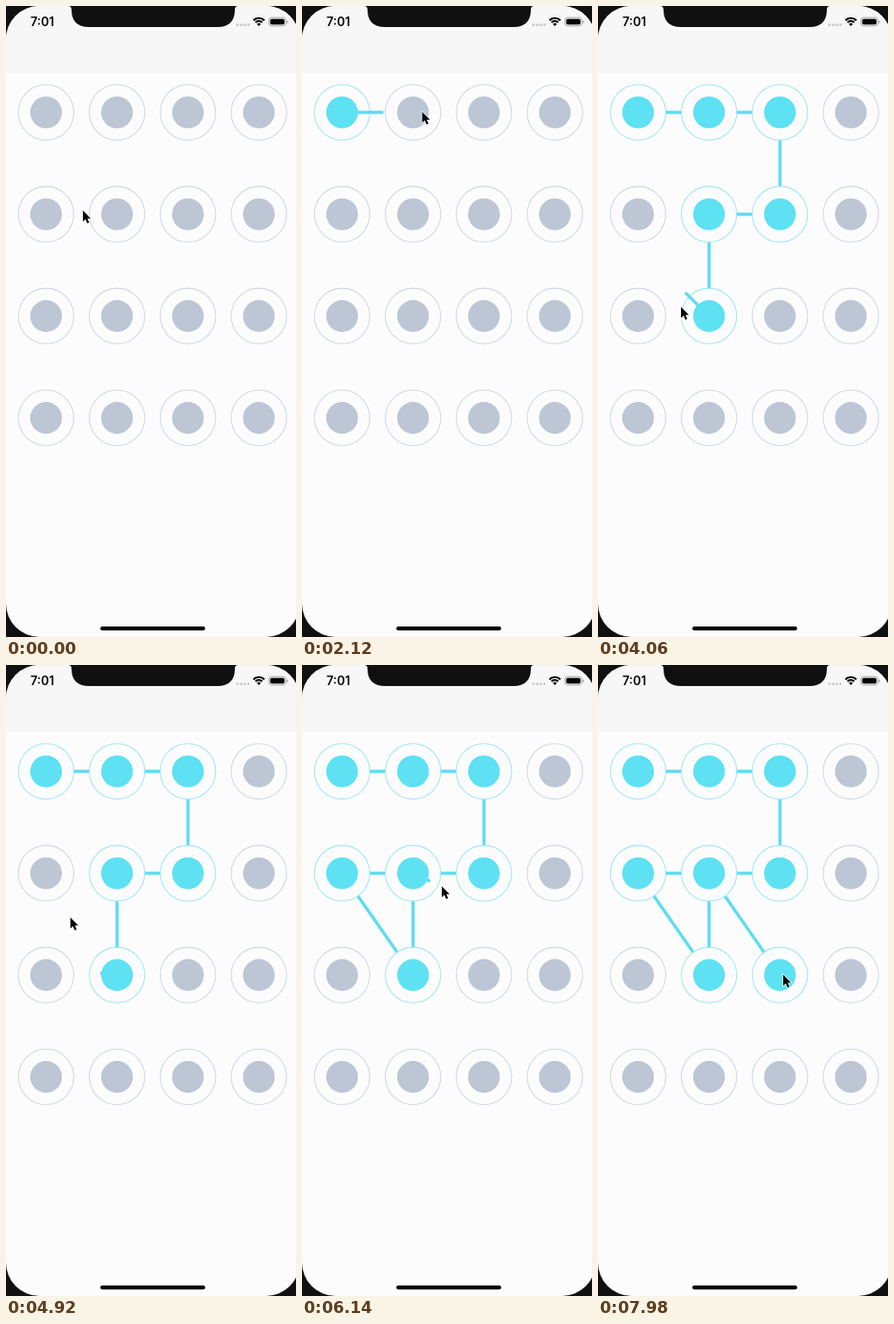
These frames come from a looping animation (332 by 720 pixels, 8 s). An HTML page with a canvas:

```html
<!DOCTYPE html>
<html lang="en">
<head>
<meta charset="utf-8">
<title>Pattern lock</title>
<style>
  html, body { margin: 0; width: 100%; height: 100%; overflow: hidden; background: #101010; }
  canvas { display: block; }
</style>
</head>
<body>
<canvas id="stage" width="332" height="720"></canvas>
<script>
const ctx = document.getElementById('stage').getContext('2d');
const LOOP = 8000;
const LAG = 300; // the screen responds a little after the pointer
const TOUCH = 1500;
const RING = 31.7, DOT = 18.2;
const BLACK = '#101010', INK = '#060606', PAPER = '#fcfcfc', GREY = '#a4a4a4';
const IDLE = { dot: '#bdc6d5', ring: '#d0d7e4' };
const ACTIVE = { dot: '#5de1f3', ring: '#a0e6f4' };

const nodes = Array.from({ length: 16 }, (_, i) => ({
  x: 45.9 + (i % 4) * 81.2,
  y: 121.4 + Math.floor(i / 4) * 116.2
}));

const at = (time, x, y) => ({ time, x, y });
const trace = (start, step, ...ids) =>
  ids.map((id, i) => at(start + i * step, nodes[id].x, nodes[id].y));

// Quick strokes through the nodes, with pauses to wander in between
const path = [
  at(0, 88, 234), at(960, 141, 233),
  ...trace(TOUCH, 550, 0, 1, 2), at(2960, 201, 186),
  ...trace(3130, 220, 6, 5, 9), at(3760, 100, 327), at(4060, 95, 344), at(4620, 108, 352),
  ...trace(5165, 235, 4, 5), at(6140, 160, 253), at(6950, 212, 354)
];

function pointerAt(t) {
  const next = path.findIndex(p => p.time > t);
  if (next < 0) return path[path.length - 1];
  if (next === 0) return path[0];
  const a = path[next - 1], b = path[next];
  const k = (t - a.time) / (b.time - a.time);
  return { x: a.x + (b.x - a.x) * k, y: a.y + (b.y - a.y) * k };
}

// A node joins the pattern when the touch enters its dot.
const joins = [];
for (let time = TOUCH; time < LOOP; time += 10) {
  const p = pointerAt(time);
  const node = nodes.find(n => Math.hypot(n.x - p.x, n.y - p.y) < DOT);
  if (node && node !== joins[joins.length - 1]?.node) joins.push({ time, node });
}

function circle(x, y, radius) {
  ctx.beginPath();
  ctx.arc(x, y, radius, 0, Math.PI * 2);
}

function line(a, b) {
  ctx.strokeStyle = '#60dcf1';
  ctx.lineWidth = 3.6;
  ctx.beginPath();
  ctx.moveTo(a.x, a.y);
  ctx.lineTo(b.x, b.y);
  ctx.stroke();
}

function rounded(x, y, w, h, radius, color) {
  ctx.fillStyle = color;
  ctx.beginPath();
  ctx.roundRect(x, y, w, h, radius);
  ctx.fill();
}

function drawScreen() {
  ctx.fillStyle = BLACK;
  ctx.fillRect(0, 0, 332, 720);
  rounded(0, 0, 336, 720, 38, PAPER);
  ctx.save();
  ctx.clip();
  ctx.fillStyle = '#f7f7f7';
  ctx.fillRect(0, 0, 332, 76.5);
  ctx.restore();
}

function drawPattern(t) {
  const joined = joins.filter(j => j.time <= t).map(j => j.node);
  const look = node => joined.includes(node) ? ACTIVE : IDLE;
  joined.slice(1).forEach((node, i) => line(joined[i], node));

  for (const node of nodes) {
    circle(node.x, node.y, RING);
    ctx.fillStyle = PAPER;
    ctx.fill();
    ctx.strokeStyle = look(node).ring;
    ctx.lineWidth = 1.1;
    ctx.stroke();
  }

  if (joined.length) line(joined[joined.length - 1], pointerAt(t));

  for (const node of nodes) {
    circle(node.x, node.y, DOT);
    ctx.fillStyle = look(node).dot;
    ctx.fill();
  }
}

function drawStatusBar() {
  // Notch with flared upper corners
  ctx.fillStyle = BLACK;
  ctx.fill(new Path2D('M71 0Q75 0 75 4Q75 24 95 24H242Q262 24 262 4Q262 0 266 0Z'));

  ctx.fillStyle = INK;
  ctx.font = '600 14px Inter, sans-serif';
  ctx.fillText('7:01', 28, 23);

  ctx.fillStyle = '#c8c8c8';
  for (let i = 0; i < 4; i++) {
    circle(265 + i * 4.2, 21.4, 1.5);
    ctx.fill();
  }

  ctx.strokeStyle = INK;
  ctx.lineWidth = 2.1;
  for (const radius of [8.6, 5.3]) {
    ctx.beginPath();
    ctx.arc(289.5, 22.4, radius, -Math.PI * 0.76, -Math.PI * 0.24);
    ctx.stroke();
  }
  ctx.fillStyle = INK;
  ctx.fill(new Path2D('M289.5 23L287.2 20.4Q289.5 18.5 291.8 20.4Z'));

  ctx.strokeStyle = GREY;
  ctx.lineWidth = 1;
  ctx.beginPath();
  ctx.roundRect(300.9, 13.2, 19.4, 9.6, 3);
  ctx.stroke();
  rounded(302.4, 14.7, 16.4, 6.6, 1.8, INK);
  rounded(321.3, 16.4, 1.4, 3.4, 0.7, GREY);
}

function drawPointer({ x, y }) {
  ctx.save();
  ctx.translate(x, y - 0.7);
  const arrow = new Path2D('M0 0V12.6L2.9 9.9L5 14.6L7.2 13.6L5.2 9.1H9Z');
  ctx.strokeStyle = '#fff';
  ctx.lineWidth = 1.4;
  ctx.stroke(arrow);
  ctx.fillStyle = INK;
  ctx.fill(arrow);
  ctx.restore();
}

function render(now) {
  const t = now % LOOP;
  drawScreen();
  drawPattern(t - LAG);
  drawStatusBar();
  rounded(108, 708, 120, 4.5, 2.25, INK);
  drawPointer(pointerAt(t));
}

const start = performance.now();
function tick() {
  render(performance.now() - start);
  requestAnimationFrame(tick);
}
tick();
</script>
</body>
</html>
```
